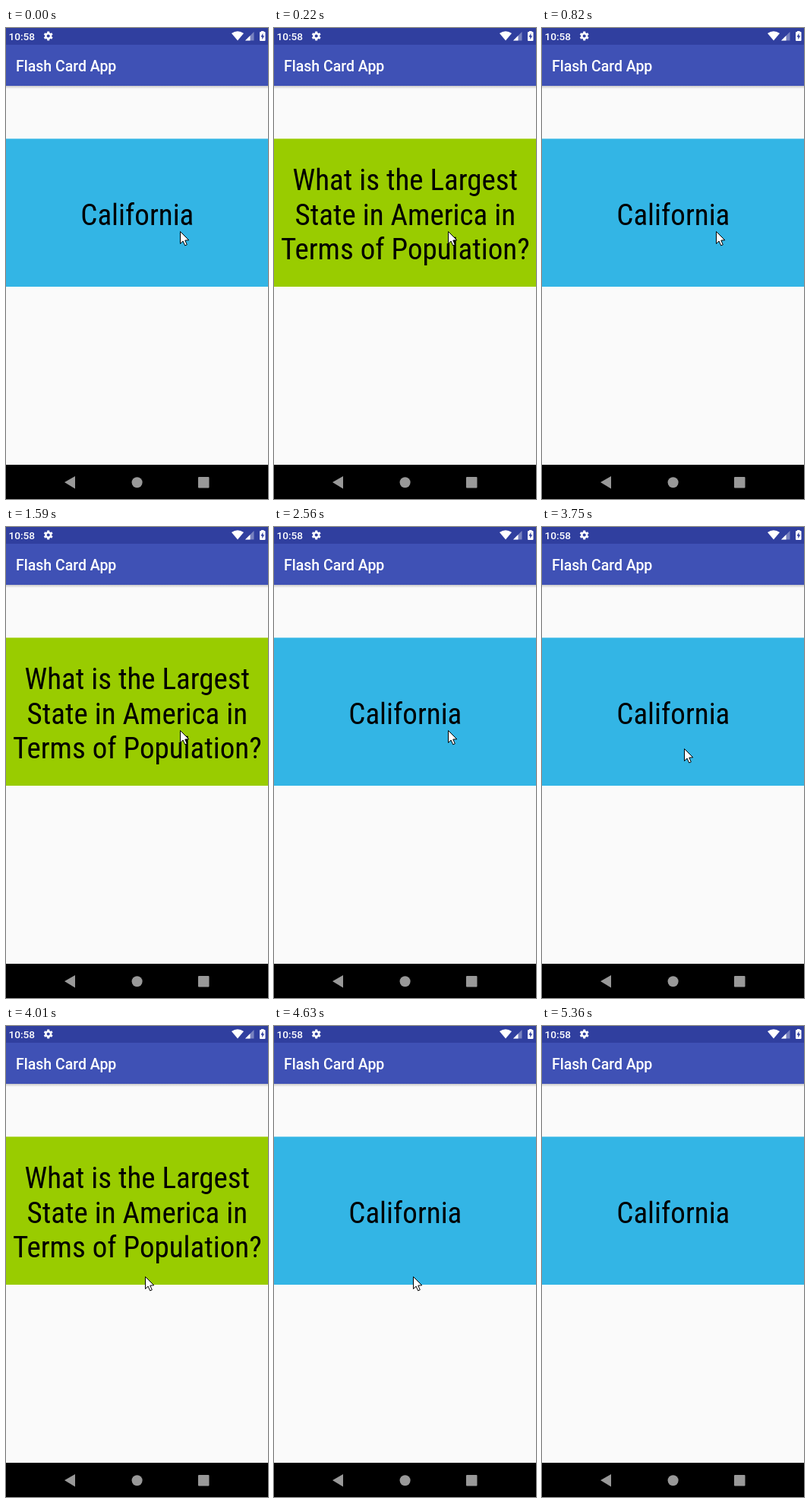
An HTML page with a canvas that plays this animation: 345 by 619 pixels, repeating every 6940 ms.

```html
<!DOCTYPE html>
<html lang="en">
<head>
<meta charset="utf-8">
<title>Flash cards</title>
<style>
html, body { margin: 0; width: 100%; height: 100%; overflow: hidden; background: #fafafa; }
canvas { display: block; width: 345px; height: 619px; }
</style>
</head>
<body>
<canvas id="stage" width="345" height="619"></canvas>
<script>
const W = 345, H = 619, LOOP = 6940;
const canvas = document.getElementById('stage');
const ratio = window.devicePixelRatio || 1;
canvas.width = Math.round(W * ratio);
canvas.height = Math.round(H * ratio);
const ctx = canvas.getContext('2d');

const CARD_FONT = 'condensed 39px "Roboto Condensed", Roboto, sans-serif';
const PLAIN_FONT = '39px Roboto, sans-serif';
const QUESTION = ['What is the Largest', 'State in America in', 'Terms of Population?'];
const ANSWER = ['California'];
const questionTimes = [[220, 820], [1590, 2560], [3900, 4630]];

// Pointer strokes: start, end, number of steps, points of the path.
const strokes = [
  { from: 2700, to: 2960, steps: 10, path: [[229, 267], [234, 318], [230, 385], [220, 424]] },
  { from: 3360, to: 3750, steps: 10, path: [[220, 424], [218, 434], [202, 365], [187, 291]] },
  { from: 3935, to: 4010, steps: 3, path: [[187, 291], [186, 304], [184, 318], [183, 329]] },
  { from: 4750, to: 5050, steps: 12, path: [[183, 329], [208, 420], [282, 535], [346, 594]] }
];

function rect(x, y, w, h, color) {
  ctx.fillStyle = color;
  ctx.fillRect(x, y, w, h);
}

function poly(points, color) {
  ctx.beginPath();
  points.forEach(([x, y]) => ctx.lineTo(x, y));
  ctx.closePath();
  ctx.fillStyle = color;
  ctx.fill();
}

function disc(x, y, r, color) {
  ctx.beginPath();
  ctx.arc(x, y, r, 0, Math.PI * 2);
  ctx.fillStyle = color;
  ctx.fill();
}

function label(text, x, y, font, color) {
  ctx.font = font;
  ctx.textAlign = 'left';
  ctx.fillStyle = color;
  ctx.fillText(text, x, y);
}

function textWidth(text, font) {
  ctx.font = font;
  return ctx.measureText(text).width;
}

// Narrow the regular face only where no condensed face is present.
const narrow = textWidth(QUESTION[2], CARD_FONT) / textWidth(QUESTION[2], PLAIN_FONT) > 0.95 ? 0.89 : 1;

function along(path, p) {
  const pos = Math.min(p, 1) * (path.length - 1);
  const i = Math.min(Math.floor(pos), path.length - 2);
  const f = pos - i;
  return [0, 1].map(k => path[i][k] + (path[i + 1][k] - path[i][k]) * f);
}

function pointerAt(t) {
  if (t >= 5050) return t >= 5330 && t < 5360 ? [329, 599] : null;
  let spot = strokes[0].path[0];
  for (const s of strokes) {
    if (t < s.from) break;
    const step = Math.floor((t - s.from) / (s.to - s.from) * (s.steps - 1) + 1e-6);
    spot = along(s.path, (step + 1) / s.steps);
  }
  return spot.map(Math.round);
}

function drawGear(x, y) {
  ctx.strokeStyle = '#fff';
  ctx.lineWidth = 3;
  for (let i = 0; i < 3; i++) {
    const a = i * Math.PI / 3 + Math.PI / 2;
    const dx = Math.cos(a) * 6, dy = Math.sin(a) * 6;
    ctx.beginPath();
    ctx.moveTo(x - dx, y - dy);
    ctx.lineTo(x + dx, y + dy);
    ctx.stroke();
  }
  disc(x, y, 4.5, '#fff');
  disc(x, y, 2, '#303f9f');
}

function drawStatusBar() {
  rect(0, 0, W, 22, '#303f9f');
  label('10:58', 3.5, 15.5, '500 13.65px Roboto, sans-serif', '#fff');
  drawGear(55.7, 10.5);

  ctx.beginPath();
  ctx.moveTo(305, 16.5);
  ctx.lineTo(297, 7);
  ctx.quadraticCurveTo(305, 1.5, 313, 7);
  ctx.closePath();
  ctx.fillStyle = '#fff';
  ctx.fill();

  poly([[315, 16.5], [326.5, 16.5], [326.5, 5]], 'rgba(255,255,255,.35)');
  poly([[315, 16.5], [321.5, 16.5], [321.5, 10]], '#fff');

  rect(336, 4, 3.5, 2, '#fff');
  ctx.beginPath();
  ctx.roundRect(334, 5, 7.5, 12, 1);
  ctx.fillStyle = '#fff';
  ctx.fill();
  poly([[338.4, 6.8], [335.5, 11.7], [337.3, 11.7], [337.3, 15.3], [340.2, 10.3], [338.4, 10.3]], '#303f9f');
}

function drawAppBar() {
  const shade = ctx.createLinearGradient(0, 76, 0, 80);
  shade.addColorStop(0, 'rgba(0,0,0,.2)');
  shade.addColorStop(1, 'rgba(0,0,0,0)');
  rect(0, 76, W, 4, shade);
  rect(0, 22, W, 54, '#3f51b5');
  label('Flash Card App', 13, 56.5, '500 19.5px Roboto, sans-serif', '#fff');
}

function drawNavBar() {
  const gray = '#999';
  rect(0, 574, W, 45, '#000');
  poly([[77, 597], [91, 589], [91, 605.5]], gray);
  disc(172.6, 597.3, 7, gray);
  ctx.beginPath();
  ctx.roundRect(253, 590, 14.5, 14.5, 1);
  ctx.fillStyle = gray;
  ctx.fill();
}

function drawCard(asking) {
  const lines = asking ? QUESTION : ANSWER;
  rect(0, 145.5, W, 194.5, asking ? '#99cc00' : '#33b5e5');
  ctx.font = CARD_FONT;
  ctx.textAlign = 'center';
  ctx.fillStyle = '#000';
  lines.forEach((line, i) => {
    ctx.save();
    ctx.translate(W / 2 + 0.3, 258.7 + (i - (lines.length - 1) / 2) * 45.5);
    ctx.scale(narrow, 1);
    ctx.fillText(line, 0, 0);
    ctx.restore();
  });
}

function drawPointer([x, y]) {
  ctx.save();
  ctx.translate(x + 0.5, y + 0.5);
  poly([[0, 0], [0, 16], [3.6, 12.6], [6.2, 18.4], [8.8, 17.3], [6.3, 11.6], [11.3, 11.3]], '#fff');
  ctx.strokeStyle = '#000';
  ctx.lineWidth = 1;
  ctx.stroke();
  ctx.restore();
}

function draw(t) {
  ctx.setTransform(ratio, 0, 0, ratio, 0, 0);
  rect(0, 0, W, H, '#fafafa');
  drawStatusBar();
  drawAppBar();
  drawCard(questionTimes.some(([a, b]) => t >= a && t < b));
  drawNavBar();
  const spot = pointerAt(t);
  if (spot) drawPointer(spot);
}

const start = performance.now();
function tick() {
  draw((performance.now() - start) % LOOP);
  requestAnimationFrame(tick);
}
tick();
</script>
</body>
</html>
```
